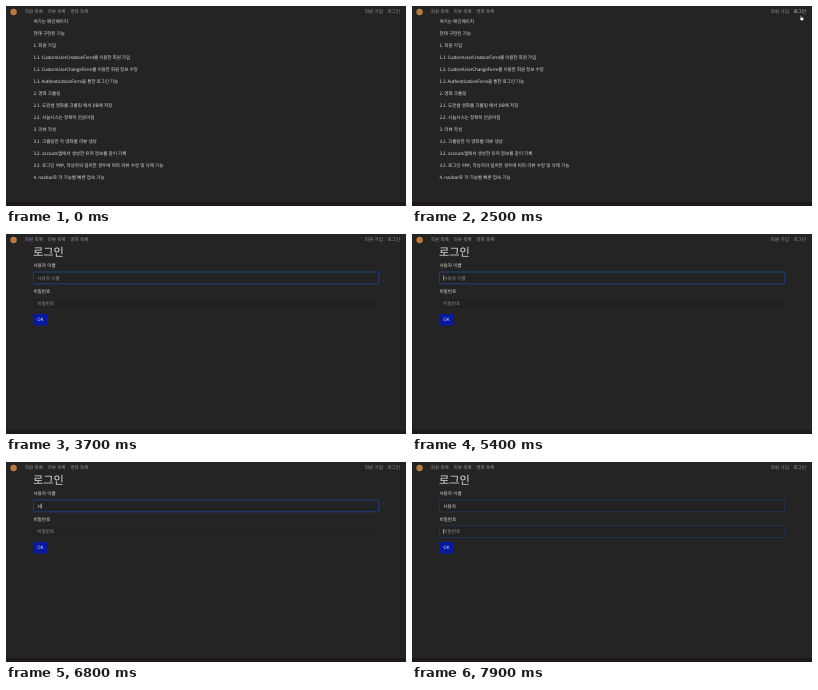
Write an HTML page that moves like this. It is 400 px wide and 200 px high and loops after 8 s.

```html
<!DOCTYPE html>
<html lang="ko">
<head>
<meta charset="utf-8">
<title>로그인</title>
<style>
  html, body { margin: 0; width: 100%; height: 100%; overflow: hidden; background: #242424; }
  svg { display: block; width: 400px; height: 200px; }
  text {
    font: 4.6px "Noto Sans CJK KR", "Noto Sans CJK", "Noto Sans CJK JP", "Noto Sans", sans-serif;
    fill: #dedede;
    text-rendering: geometricPrecision;
  }
  .nav { fill: #969696; }
  .nav.hover { fill: #cfcfcf; }
  #home text { letter-spacing: -.07px; }
  #home .code { letter-spacing: -.15px; }
  .title { font-size: 11.2px; }
  .hint { fill: #8f8f8f; }
  .box { fill: #222; stroke: #2e2e2e; stroke-width: .4; }
  .focus { fill: none; stroke: #1b479c; stroke-width: .8; }
  .caret { fill: #ddd; }
</style>
</head>
<body>
<svg viewBox="0 0 400 200">
  <rect width="400" height="200" fill="#242424"/>
  <rect y="196" width="400" height="4" fill="#20191c"/>
  <circle cx="7.6" cy="6" r="3.2" fill="#bb7a3a"/>
  <text class="nav" x="18.8" y="7.3">회원 목록</text>
  <text class="nav" x="41.6" y="7.3">리뷰 목록</text>
  <text class="nav" x="64.2" y="7.3">영화 목록</text>
  <text class="nav" x="358.8" y="7.3">회원 가입</text>
  <text class="nav" id="login" x="381.4" y="7.3">로그인</text>

  <g id="home"></g>

  <g id="form">
    <text class="title" x="27" y="21.8">로그인</text>
    <text x="27.4" y="33.4">사용자 이름</text>
    <rect class="box" x="27.4" y="38" width="345.4" height="11.8" rx="1.2"/>
    <rect class="focus" id="userFocus" x="27.4" y="38" width="345.4" height="11.8" rx="1.2"/>
    <text id="user" x="31.3" y="45.5"></text>
    <text x="27.4" y="59.4">비밀번호</text>
    <rect class="box" x="27.4" y="63.7" width="345.4" height="11.8" rx="1.2"/>
    <rect class="focus" id="passFocus" x="27.4" y="63.7" width="345.4" height="11.8" rx="1.2"/>
    <text class="hint" x="31.3" y="71.2">비밀번호</text>
    <rect class="caret" id="caret" width=".5" height="5.4"/>
    <rect x="27.3" y="80" width="14.2" height="11.6" rx="1.2" fill="#0719a0"/>
    <text x="34.4" y="87.4" text-anchor="middle">OK</text>
  </g>

  <path id="arrow" d="M0 0V3.4L.8 2.7L1.3 3.9L1.9 3.7L1.4 2.5H2.3Z" fill="#fff" stroke="#111" stroke-width=".2"/>
  <path id="hand" d="M1 .4Q1.5 -.2 1.9 .4V2L3.8 2.5Q4.3 2.7 4.2 3.3L3.7 5.3H1.4L0 3.3Q.2 2.6 1 3.2Z"
        fill="#fff" stroke="#111" stroke-width=".3"/>
</svg>
<script>
const LOOP = 8000, STEP = 100;
const $ = id => document.getElementById(id);

const lines = [
  '여기는 메인페이지',
  '현재 구현된 기능',
  '1. 회원 가입',
  '1.1. CustomUserCreationForm를 이용한 회원 가입',
  '1.2. CustomUserChangeForm를 이용한 회원 정보 수정',
  '1.3. AuthenticationForm을 통한 로그인 기능',
  '2. 영화 크롤링',
  '2.1. 도란샘 영화를 크롤링 해서 DB에 저장',
  '2.2. 시놉시스는 정확히 안긁어짐',
  '3. 리뷰 작성',
  '3.1. 크롤링한 각 영화별 리뷰 생성',
  '3.2. accouts앱에서 생성한 유저 정보를 같이 기록',
  '3.3. 로그인 여부, 작성자와 일치한 경우에 따라 리뷰 수정 및 삭제 기능',
  '4. navbar로 각 기능별 빠른 접속 기능'
];
lines.forEach((line, i) => {
  const text = document.createElementNS('http://www.w3.org/2000/svg', 'text');
  text.setAttribute('x', 27.4);
  text.setAttribute('y', 16.7 + 12 * i);
  if (line.includes('Form')) text.setAttribute('class', 'code');
  text.textContent = line;
  $('home').append(text);
});

// [start time, field content]
const typing = [
  [0, ''], [5700, 't'], [5800, 'tk'], [6300, 't'], [6400, ''],
  [6600, 'ㅅ'], [6700, '사'], [7100, '사요'], [7300, '사용'],
  [7500, '사용ㅈ'], [7600, '사용자']
];
const caretOff = [[3700, 4300], [4800, 5400]];

const clamp = v => Math.min(1, Math.max(0, v));
const ease = v => v * v * (3 - 2 * v);
const progress = (t, from, to) => ease(clamp((t - from) / (to - from)));
const mix = (a, b, k) => a + (b - a) * k;
const show = (el, on) => { el.style.display = on ? '' : 'none'; };

function drawPointer(t) {
  const up = progress(t, 200, 1100), across = progress(t, 1400, 2200);
  const x = mix(mix(311, 303.7, up), 388, across);
  const y = mix(mix(95, 33.2, up), 9.6, across);
  const onLink = t >= 2300 && t < 3200;
  show($('arrow'), t >= 300 && t < 3400 && !onLink);
  show($('hand'), onLink);
  const ax = t >= 3200 ? 389 : x;
  $('arrow').setAttribute('transform', `translate(${ax} ${y})`);
  $('hand').setAttribute('transform', `translate(387.5 ${t < 2500 ? 9 : 9.3})`);
  $('login').classList.toggle('hover', t >= 2200 && t < 3300);
}

function drawForm(t) {
  const value = typing.filter(([start]) => start <= t).pop()[1];
  const user = $('user'), inPass = t >= 7800;
  user.textContent = value || '사용자 이름';
  user.classList.toggle('hint', !value);

  const leave = clamp((t - 7700) / 400);
  $('userFocus').style.opacity = clamp((t - 3150) / 300) * (1 - leave);
  $('passFocus').style.opacity = leave;

  const caret = $('caret');
  const width = value && !inPass ? user.getComputedTextLength() : 0;
  caret.setAttribute('x', 31.1 + width);
  caret.setAttribute('y', inPass ? 66.9 : 41.2);
  show(caret, !caretOff.some(([a, b]) => t >= a && t < b));
}

function frame(now) {
  const t = Math.floor(now % LOOP / STEP) * STEP;
  const onForm = t >= 3200;
  show($('home'), !onForm);
  show($('form'), onForm);
  drawPointer(t);
  if (onForm) drawForm(t);
  requestAnimationFrame(frame);
}
frame(0);
</script>
</body>
</html>
```
